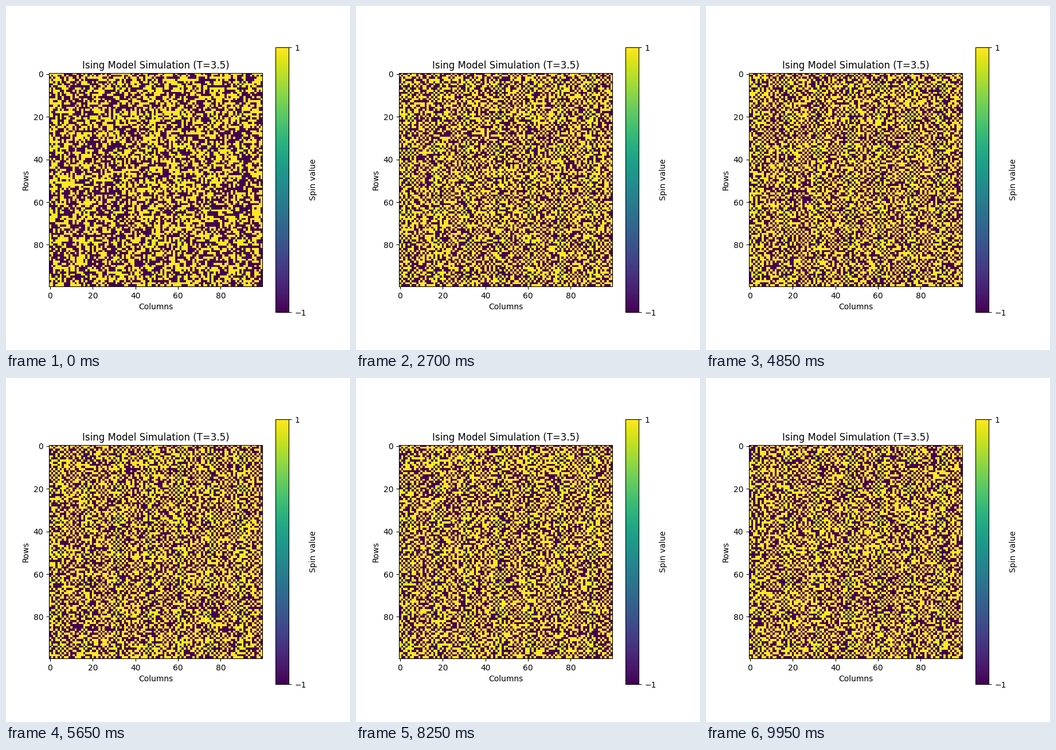
Animation, 600 px wide and 600 px high, one loop 10 s. Source, as a matplotlib script:

```python
import numpy as np
import matplotlib.pyplot as plt
from matplotlib.animation import FuncAnimation

SIZE = 100
TEMP = 3.5
FRAMES = 200
INTERVAL = 50
ROUNDS = 8  # partial sublattice updates that add up to one sweep

rng = np.random.default_rng(7)
parity = np.indices((SIZE, SIZE)).sum(axis=0) % 2


def neighbour_sum(s):
    return sum(np.roll(s, step, axis) for axis in (0, 1) for step in (1, -1))


def sweep(s):
    """One Metropolis sweep in which neighbours prefer opposite spins."""
    s = s.copy()
    for k in range(ROUNDS):
        chosen = (parity == k % 2) & (rng.random(s.shape) < 2 / ROUNDS)
        cost = -2 * s * neighbour_sum(s)
        accept = rng.random(s.shape) < np.exp(-cost / TEMP)
        s[chosen & accept] *= -1
    return s


def simulate():
    states = [rng.choice([-1, 1], size=(SIZE, SIZE))]
    while len(states) < FRAMES:
        states.append(sweep(states[-1]))
    return states


states = simulate()

fig, ax = plt.subplots(figsize=(6, 6), dpi=100)
image = ax.imshow(states[0], cmap="viridis", vmin=-1, vmax=1)
fig.colorbar(image, ax=ax, ticks=[-1, 1], label="Spin value")
ax.set_title(f"Ising Model Simulation (T={TEMP})")
ax.set_xlabel("Columns")
ax.set_ylabel("Rows")


def update(frame):
    image.set_data(states[frame])
    return [image]


anim = FuncAnimation(fig, update, frames=FRAMES, interval=INTERVAL,
                     repeat=True, repeat_delay=0)
plt.show()
```
